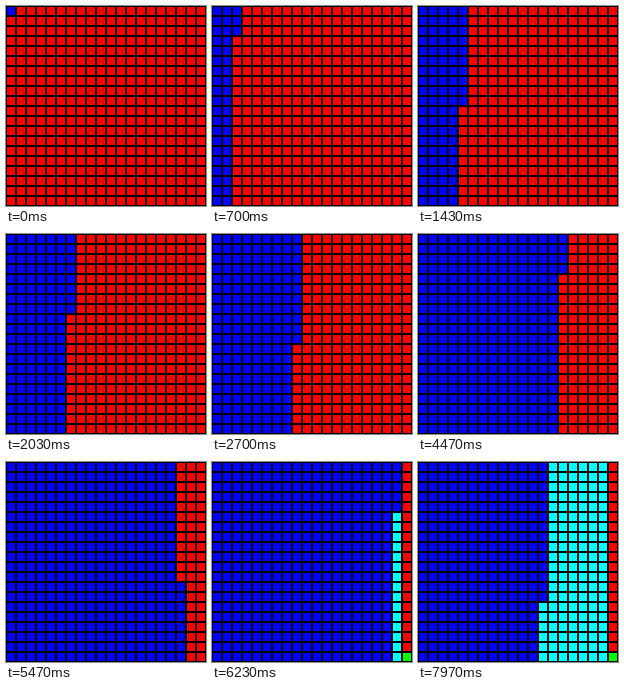
Recreate the animation shown at these times as an HTML page with a canvas. Size 200 by 200 pixels, loop 8000 ms.

```html
<!DOCTYPE html>
<html lang="en">
<head>
<meta charset="utf-8">
<title>Grid search</title>
<style>
  html, body { margin: 0; width: 100%; height: 100%; overflow: hidden; background: #000; }
  canvas { display: block; width: 100vw; height: 100vh; image-rendering: pixelated; }
</style>
</head>
<body>
<canvas id="stage" width="200" height="200"></canvas>
<script>
const ctx = document.getElementById('stage').getContext('2d');
const SIZE = 20, CELL = 10;
const LOOP = 8000, FPS = 30;
const RATE = 64 / FPS;              // cells per tick
const GOAL = SIZE * (SIZE - 1);     // step at which the bottom right cell is reached
const GOAL_TICK = 180;
const RED = '#f00', BLUE = '#00f', CYAN = '#0ff', GREEN = '#0f0';

// Number of cells still on the search path.
function pathLength(tick) {
  const forward = Math.max(tick + 1, Math.floor(RATE * tick - 1.4));
  const back = Math.floor(764.4 - RATE * tick);
  return Math.min(forward, back, GOAL);
}

function colorOf(step, length, found) {
  if (step < length) return BLUE;
  if (!found || step > GOAL) return RED;
  return step === GOAL ? GREEN : CYAN;
}

// The path snakes down even columns and up odd ones.
function draw(time) {
  const tick = Math.floor((time % LOOP + 5) * FPS / 1000) % (LOOP * FPS / 1000);
  const length = pathLength(tick);
  const found = tick >= GOAL_TICK;
  ctx.fillStyle = '#000';
  ctx.fillRect(0, 0, SIZE * CELL, SIZE * CELL);
  for (let step = 0; step < SIZE * SIZE; step++) {
    const col = Math.floor(step / SIZE);
    const offset = step % SIZE;
    const row = col % 2 ? SIZE - 1 - offset : offset;
    ctx.fillStyle = colorOf(step, length, found);
    ctx.fillRect(col * CELL + 1, row * CELL + 1, CELL - 2, CELL - 2);
  }
}

const start = performance.now();
function loop() {
  draw(performance.now() - start);
  requestAnimationFrame(loop);
}
loop();
</script>
</body>
</html>
```
